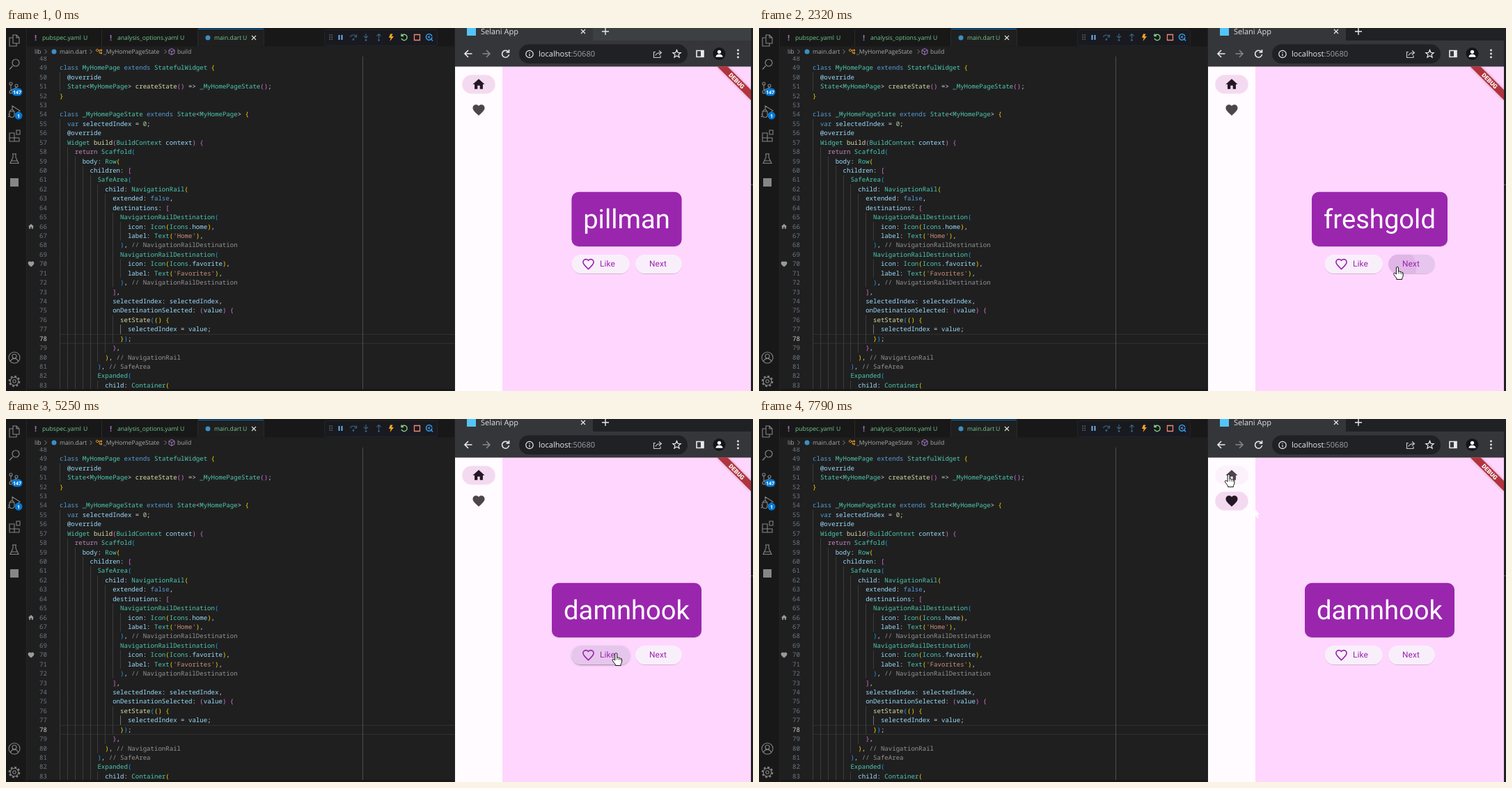
An HTML page for the animation above (8 s loop, 1073 by 522 pixels).

```html
<!DOCTYPE html>
<html lang="en">
<head>
<meta charset="utf-8">
<title>Editor and app preview</title>
<style>
html, body { margin: 0; width: 100%; height: 100%; overflow: hidden; background: #1f1f1f; }
svg { display: block; text-rendering: geometricPrecision; }
.code { font: 9.07px "Noto Sans Mono", monospace; }
.ui { font: 8.65px "Open Sans", sans-serif; }
.app { font-family: Roboto, sans-serif; }
</style>
</head>
<body>
<svg id="stage" width="1073" height="522" viewBox="0 0 1073 522"></svg>
<script>
const LOOP = 8000;
const stage = document.getElementById('stage');
const PURPLE = '#9a25ae';
const HOME = 'M10 20v-6h4v6h5v-8h3L12 3 2 12h3v8z';
const HEART = 'M12 21.35l-1.45-1.32C5.4 15.36 2 12.28 2 8.5 2 5.42 4.42 3 7.5 3c1.74 0 3.41.81 4.5 2.09C13.09 3.81 14.76 3 16.5 3 19.58 3 22 5.42 22 8.5c0 3.78-3.4 6.86-8.55 11.54z';

const rect = (x, y, w, h, fill, more = '') =>
  `<rect x="${x}" y="${y}" width="${w}" height="${h}" fill="${fill}" ${more}/>`;
const dot = (x, y, r, fill, more = '') =>
  `<circle cx="${x}" cy="${y}" r="${r}" fill="${fill}" ${more}/>`;
const text = (x, y, s, fill, more = '') =>
  `<text x="${x}" y="${y}" fill="${fill}" ${more}>${s.replace(/&/g, '&amp;').replace(/</g, '&lt;')}</text>`;
// Stroked glyph drawn around its own centre
const line = (x, y, d, color, w = 1.1, fill = 'none') =>
  `<path transform="translate(${x} ${y})" d="${d}" fill="${fill}" stroke="${color}" stroke-width="${w}"/>`;
// Filled icon on a 24 unit grid
const icon = (d, x, y, scale, more) =>
  `<path d="${d}" transform="translate(${x} ${y}) scale(${scale}) translate(-12 -12)" ${more}/>`;

const CODE = `
class MyHomePage extends StatefulWidget {
  @override
  State<MyHomePage> createState() => _MyHomePageState();
}

class _MyHomePageState extends State<MyHomePage> {
  var selectedIndex = 0;
  @override
  Widget build(BuildContext context) {
    return Scaffold(
      body: Row(
        children: [
          SafeArea(
            child: NavigationRail(
              extended: false,
              destinations: [
                NavigationRailDestination(
                  icon: Icon(Icons.home),
                  label: Text('Home'),
                ), // NavigationRailDestination
                NavigationRailDestination(
                  icon: Icon(Icons.favorite),
                  label: Text('Favorites'),
                ), // NavigationRailDestination
              ],
              selectedIndex: selectedIndex,
              onDestinationSelected: (value) {
                setState(() {
                  selectedIndex = value;
                });
              },
            ), // NavigationRail
          ), // SafeArea
          Expanded(
            child: Container(`.split('\n');

const BRACKETS = ['#ffd700', '#da70d6', '#179fff'];
let depth = 0;

function colorOf(tok, rest) {
  if (tok.startsWith('//')) return '#939393';
  if (tok[0] === "'") return '#ce9178';
  if (/^[([{]$/.test(tok)) return BRACKETS[depth++ % 3];
  if (/^[)\]}]$/.test(tok)) return BRACKETS[--depth % 3];
  if (/^(class|extends|var|false)$/.test(tok)) return '#569cd6';
  if (tok === 'return') return '#c586c0';
  if (/^_?[A-Z]/.test(tok)) return '#4ec9b0';
  if (/^\d/.test(tok)) return '#b5cea8';
  if (/^@?\w/.test(tok)) return rest[0] === '(' ? '#dcdcaa' : '#9cdcfe';
  return '#d4d4d4';
}

function editor() {
  const cw = 5.44, lh = 13.43, x0 = 77;
  let out = rect(30, 41, 615, 481, '#1f1f1f');
  out += rect(77, 440, 568, 1, '#303030') + rect(77, 453, 568, 1, '#303030');
  out += rect(512, 41, 1, 481, '#4e4e4e');
  CODE.forEach((src, i) => {
    const n = 48 + i, mid = 57.2 + lh * (i - 1), base = mid + 3.1;
    out += text(59, base, String(n), n === 78 ? '#d0d0d0' : '#6e7681', 'text-anchor="end"');
    const indent = src.search(/\S/) / 2;
    for (let j = 0; j < indent; j++)
      out += rect(Math.round(x0 + j * 2 * cw), mid - lh / 2, 1, lh, j === 8 && n === 77 ? '#707070' : '#3c3c3c');
    for (const m of src.matchAll(/\/\/.*|'[^']*'|@?\w+|\S/g))
      out += text(x0 + m.index * cw, base, m[0], colorOf(m[0], src.slice(m.index + m[0].length)));
  });
  out += icon(HOME, 36, 285.5, .42, 'fill="#9a9a9a"') + icon(HEART, 36, 339.5, .44, 'fill="#9a9a9a"');
  return `<g class="code">${out}</g>` + rect(30, 519, 615, 3, '#181818');
}

function tabs() {
  const green = '#73c991', grey = '#a9a9a9';
  let out = rect(30, 0, 615, 27, '#181818') + rect(30, 26.4, 615, 14.6, '#1f1f1f');
  out += rect(276, 1.5, 94, 25, '#1f1f1f') + rect(276, 1, 94, 1, '#0078d4');
  for (const x of [137, 275, 370]) out += rect(x, 2, 1, 24.4, '#2b2b2b');
  const bang = 'font-weight="700" font-size="11"';
  out += text(41, 18, '!', '#a074c4', bang) + text(149, 18, '!', '#a074c4', bang);
  out += text(52, 17, 'pubspec.yaml', green) + text(111, 17, 'U', green);
  out += text(160, 17, 'analysis_options.yaml', green) + text(250, 17, 'U', green);
  out += dot(290, 14, 3.5, '#3b8ec2') + text(299, 17, 'main.dart', green) + text(340, 17, 'U', green);
  out += line(356, 14, 'M-3-3L3 3M3-3L-3 3', '#e0e0e0');
  out += text(41, 37, 'lib', grey) + text(77, 37, 'main.dart', grey);
  out += text(140, 37, '_MyHomePageState', grey) + text(246, 37, 'build', grey);
  for (const x of [57, 122, 229]) out += line(x, 34, 'M-1.5-3L1.5 0L-1.5 3', '#8a8a8a', .9);
  out += dot(69, 34, 3.5, '#3b8ec2');
  out += line(133, 34, 'M-4-2l2-2 2 2-2 2zM0-2h3M1-2v4h2M3-3h1.5v2H3zM3 1h1.5v2H3z', '#ee9d28', .9);
  out += line(238, 34, 'M0-4.5L4-2.3V2.3L0 4.5-4 2.3V-2.3zM-4-2.3L0 0 4-2.3M0 0V4.5', '#b180d7', .9);

  out += rect(457.5, 2.5, 162, 23, '#181a1f', 'rx="2" stroke="#22252c"');
  for (let i = 0; i < 6; i++) out += rect(464.5 + (i % 2) * 3, 9.5 + (i >> 1) * 3, 1.3, 1.3, '#8a8a8a');
  out += line(480.5, 13.5, 'M-2-3.5V3.5M2-3.5V3.5', '#75beff', 1.8);
  const dim = '#3d5f7d';
  out += line(499, 13.5, 'M-4.5-.5C-3-4.5 3-4.5 4.5-.5M4.5-4V-.5H1', dim, 1.2) + dot(499, 16.5, 1.4, dim);
  out += line(517, 13, 'M0-5V1.5M-3-1.5L0 1.5 3-1.5', dim, 1.2) + dot(517, 17.5, 1.4, dim);
  out += line(535.5, 13, 'M0 2.5V-4.5M-3-1.5L0-4.5 3-1.5', dim, 1.2) + dot(535.5, 17.5, 1.4, dim);
  out += '<path d="M552 8.5h3.5l-1.5 3.5h3l-5.5 7 1.2-5H550z" fill="#f5a623"/>';
  out += line(572, 13.5, 'M-3.5-2.5A4.2 4.2 0 1 1-4 1.5M-4-5V-2H-1', '#89d185', 1.4);
  out += line(590.5, 13.5, 'M-4-4H4V4H-4z', '#f48771', 1.3);
  out += line(608, 13, 'M4 0A4.3 4.3 0 1 1 3.9-1M1-1.5L-1.5 0 1 1.5M2 2L5 5.5', '#3b9bea', 1.4);
  return `<g class="ui">${out}</g>`;
}

function sidebar() {
  const c = '#868686';
  const badge = (x, y, w, s) => rect(x - w / 2, y - 5.5, w, 11, '#0078d4', 'rx="5.5"') +
    text(x, y + 2.6, s, '#fff', 'text-anchor="middle" font-size="7" font-weight="700"');
  let out = rect(0, 0, 30, 522, '#181818') + rect(29, 0, 1, 522, '#252525');
  out += line(12, 18, 'M-2-8H3L7-4V4H-2zM3-8V-4H7M-2-4H-7V8H3V4', c);
  out += line(12, 52, 'M-2.5 2.5L-7 7.5M7-2A5 5 0 1 1-3-2A5 5 0 1 1 7-2z', c, 1.2);
  out += line(11, 86, 'M-2-6a2 2 0 1 1-4 0a2 2 0 1 1 4 0M6-3a2 2 0 1 1-4 0a2 2 0 1 1 4 0M-2 6a2 2 0 1 1-4 0a2 2 0 1 1 4 0M-4-4V4M4-1C4 2-3 1-4 4', c);
  out += badge(16, 92, 15, '147');
  out += line(12, 120, 'M-3-2V-8L8-1 1 4M-7 0H0V5A3.5 3.5 0 0 1-7 5zM-9 4H-7M-9 8L-7 6M-6 0A2.5 2.5 0 0 1-1 0', c);
  out += badge(18, 126, 11, '1');
  out += line(12, 155, 'M-7-4H0V3H7V8H-7zM-7 3H0V8M3-8H8V-2H3z', c);
  out += line(12, 188, 'M-3-7H3M-2-7V-2L-6 6.5H6L2-2V-7M-4 3H4', c);
  out += rect(6, 216, 12, 12, c);
  out += line(12, 474, 'M8 0A8 8 0 1 1-8 0A8 8 0 1 1 8 0zM3-2A3 3 0 1 1-3-2A3 3 0 1 1 3-2zM-5.5 5.5C-4 0 4 0 5.5 5.5', c);
  out += dot(12, 508, 2.2, 'none', `stroke="${c}" stroke-width="1.1"`);
  out += dot(12, 508, 5.8, 'none', `stroke="${c}" stroke-width="1.1"`);
  out += dot(12, 508, 7.3, 'none', `stroke="${c}" stroke-width="2" stroke-dasharray="2.9 2.83"`);
  return `<g class="ui">${out}</g>`;
}

function browser() {
  const w = '#e8eaed', g = '#9aa0a6';
  let out = rect(644, 0, 429, 522, '#202124') + rect(843, 0, 227, 18, '#202124', 'id="strip"');
  out += rect(645, 0, 198, 20, '#35363a') + rect(645, 18, 425, 38, '#35363a');
  out += rect(662, -2, 13, 13, '#54c5f8');
  out += text(682, 8.5, 'Selani App', '#dfe1e5', 'font-size="11"');
  out += line(829, 5, 'M-3-3L3 3M3-3L-3 3', w, 1.2) + line(861, 5, 'M-5 0H5M0-5V5', w, 1.4);
  out += line(664, 37, 'M5.5 0H-5M0-5L-5 0 0 5', w, 1.6) + line(690, 37, 'M-5.5 0H5M0-5L5 0 0 5', '#85888c', 1.5);
  out += line(717.5, 37, 'M4-2.8A5 5 0 1 0 5 1M5-6V-2H1', w, 1.6);
  out += rect(737, 23.5, 242, 27.5, '#202124', 'rx="13.75"');
  out += dot(752, 37.5, 5.2, 'none', `stroke="${w}" stroke-width="1.2"`) + line(752, 37.5, 'M0-2.8V-1.4M0-.3V3', w, 1.2);
  out += `<text x="765" y="41" font-size="11.1" fill="${w}">localhost<tspan fill="${g}">:50680</tspan></text>`;
  out += line(936, 37.5, 'M-3-3H-5.5V5H4V2M-3 2C-2-1 0-2 5-2M2-5L5.5-2 2 1', '#c4c7cb', 1.2);
  out += line(963.5, 37, 'M0-5.5L1.6-1.7 5.7-1.5 2.5 1.2 3.6 5.2 0 3-3.6 5.2-2.5 1.2-5.7-1.5-1.6-1.7z', w, 1.2);
  out += line(997, 37, 'M-5-4.5H5V4.5H-5z', w, 1.6) + rect(998, 32.5, 4, 9, w);
  out += dot(1024.5, 37, 9, '#141518') + dot(1024.5, 34.3, 2.6, '#fff') +
    '<path d="M1019.5 41.8c0-5.3 10-5.3 10 0z" fill="#fff"/>';
  for (const y of [32, 37, 42]) out += dot(1051.5, y, 1.4, w);
  out += rect(645, 55.5, 68, 467, '#fffbff') + rect(713, 55.5, 357, 467, '#ffd6fe');
  out += rect(1070, 225, 3, 1, '#5a5a5a');
  return `<g class="ui">${out}</g>`;
}

function banner() {
  return '<g clip-path="url(#page)"><g transform="translate(1070 55.5) rotate(45) scale(.85)">' +
    rect(-40, 28, 80, 12, '#b71c1c', 'fill-opacity=".63" filter="url(#soft)"') +
    rect(-40, 28, 80, 12, '#b0343d') +
    text(0, 37.7, 'DEBUG', '#fff', 'text-anchor="middle" font-size="10.2" font-weight="900"') + '</g></g>';
}

const BUTTONS = { like: [812.5, 83.5], next: [904, 67] };
const pill = (id, inner) => {
  const [x, w] = BUTTONS[id];
  const shape = more => rect(x, 325.7, w, 27.2, '#f9effb', 'rx="13.6" ' + more);
  return `<clipPath id="${id}Clip">${shape('')}</clipPath>` +
    `<g id="${id}Lift" opacity="0">${shape('filter="url(#high)"')}</g>` + shape('filter="url(#low)"') +
    `<g clip-path="url(#${id}Clip)">` + rect(x, 325, w, 29, PURPLE, `id="${id}Tint"`) +
    dot(0, 0, 0, PURPLE, `id="${id}Wave"`) + '</g>' + inner;
};

function app() {
  const label = 'font-size="11.9" letter-spacing=".08"';
  let out = '';
  for (const [id, y] of [['home', 81], ['fav', 118]]) {
    out += rect(655.3, y - 13.6, 47.5, 27.2, PURPLE, `rx="13.6" id="${id}Hover"`);
    out += `<g transform="translate(679 ${y})">` +
      rect(-23.75, -13.6, 47.5, 27.2, '#f4daf0', `rx="13.6" id="${id}Mark"`) + '</g>';
  }
  out += icon(HOME, 679, 81, .85, 'id="homeIcon"') + icon(HEART, 679, 118, .85, 'id="favIcon"');
  out += rect(812, 235.8, 158, 78.2, PURPLE, 'rx="10" id="card" filter="url(#low)"');
  out += text(891.5, 287.7, '', '#fff', 'id="word" font-size="38.2" text-anchor="middle"');
  out += pill('like', icon(HEART, 836.5, 339.5, .76, `id="heart" stroke="${PURPLE}" stroke-width="2.2"`) +
    text(853, 343.2, 'Like', PURPLE, label));
  out += pill('next', text(924, 343.2, 'Next', PURPLE, label));
  out += '<path id="trace" d="M713 130.5l6.5 7h-3.5l2 4.6-2.2.9-1.8-4-1 1z" fill="#fff"/>';
  out += dot(0, 0, 11, '#f0d936', 'id="flash" opacity=".8"');
  const ink = 'fill="#fff" stroke="#111" stroke-width="1" stroke-linejoin="round"';
  out += `<path id="arrow" ${ink} d="M.5.5V15.5L4 12.3 6.3 17.6 8.6 16.6 6.3 11.4H11z"/>`;
  out += `<g id="hand" ${ink}><path d="M-1.5 1Q-1.5-.5 0-.5Q1.5-.5 1.5 1V6Q3.5 5.3 4.1 6.6Q5.9 6 6.4 7.4Q8.3 7 8.3 9V12Q8.3 14 6.8 15.5V17.5H-1V16Q-3 13.5-4.7 11Q-6 9-4.6 8.3Q-3.2 8-1.5 10z"/>` +
    '<path d="M1.5 6v3.5M4.2 6.8v3M6.5 7.6v2.6" stroke-width=".7"/></g>';
  return `<g class="app">${banner()}${out}</g>`;
}

const shadow = (id, dy, blur, alpha) =>
  `<filter id="${id}" x="-20%" y="-40%" width="140%" height="200%"><feDropShadow dx="0" dy="${dy}" stdDeviation="${blur}" flood-color="#000" flood-opacity="${alpha}"/></filter>`;

stage.innerHTML = '<defs><clipPath id="page"><rect x="645" y="55.5" width="425" height="467"/></clipPath>' +
  shadow('low', .7, .7, .22) + shadow('high', 1.2, 1.5, .24) + shadow('soft', 0, 2.5, .4) + '</defs>' +
  editor() + tabs() + sidebar() + browser() + app();

const el = {};
stage.querySelectorAll('[id]').forEach(e => el[e.id] = e);
const set = (id, attrs) => { for (const k in attrs) el[id].setAttribute(k, attrs[k]); };

// Pointer stops: time, x, y
const PATH = [
  [850, 1013, 499], [1580, 911.5, 346.5], [1659, 911.5, 346.5], [1660, 916.9, 344],
  [3690, 916.9, 344], [3870, 876.3, 337], [5345, 876.3, 337], [5530, 757, 177],
  [6050, 685.2, 106.5], [6280, 685.2, 106.5], [6390, 684, 113], [7490, 684, 113], [7770, 674.6, 80.2]
];
// Presses: button, down, up, full radius
const PRESSES = [['next', 2080, 2250, 42], ['next', 2870, 3220, 42], ['like', 3880, 3950, 54], ['like', 4760, 4880, 54]];
const FLASHES = [2080, 2870, 3880, 4760, 6710];
const LEVELS = {
  next: [[1660, 0], [1760, .08], [2080, .08], [2180, .2], [3720, .2], [3800, 0]],
  like: [[3780, 0], [3840, .08], [3880, .08], [3930, .2], [5390, .2], [5530, 0]]
};

const clamp = v => Math.max(0, Math.min(1, v));
const ramp = (t, a, b) => clamp((t - a) / (b - a));
const ease = p => p * (2 - p);

function track(steps, t, curve = p => p) {
  let i = steps.findIndex(s => s[0] > t);
  if (i === 0) return steps[0].slice(1);
  if (i < 0) return steps[steps.length - 1].slice(1);
  const a = steps[i - 1], b = steps[i], p = curve(ramp(t, a[0], b[0]));
  return a.slice(1).map((v, k) => v + (b[k + 1] - v) * p);
}

function draw(t) {
  const [x, y] = track(PATH, t, ease);
  const hand = t >= 1660 && t < 5390 || t >= 5960;
  set('hand', { transform: `translate(${x} ${y})`, visibility: hand ? 'visible' : 'hidden' });
  set('arrow', { transform: `translate(${x} ${y})`, visibility: !hand && t >= 850 ? 'visible' : 'hidden' });
  const lit = FLASHES.some(f => t >= f && t < f + 140);
  set('flash', { cx: x, cy: y, visibility: lit ? 'visible' : 'hidden' });
  set('trace', { visibility: t >= 5870 ? 'visible' : 'hidden' });

  // The first click gives the browser window focus
  set('strip', { fill: t < 2080 ? '#3c4043' : '#202124' });

  const [word, width] = t < 2250 ? ['pillman', 158] : t < 3220 ? ['freshgold', 195] : ['damnhook', 215];
  el.word.textContent = word;
  set('card', { x: 891.5 - width / 2, width });
  set('heart', { fill: t >= 3950 && t < 4880 ? PURPLE : 'none' });

  for (const id in BUTTONS) {
    const level = track(LEVELS[id], t)[0];
    const press = PRESSES.find(p => p[0] === id && t >= p[1] && t < p[2] + 340);
    set(id + 'Tint', { opacity: level });
    set(id + 'Lift', { opacity: press ? 0 : clamp(level / .08) });
    if (press) {
      const [, down, up, full] = press;
      const grow = Math.max(ease(ramp(t, down, down + 800)), ramp(t, up, up + 225));
      set(id + 'Wave', { cx: x, cy: y, r: 12 + (full - 12) * grow, opacity: .12 * (1 - ramp(t, up, up + 340)) });
    } else set(id + 'Wave', { r: 0 });
  }

  const sel = ramp(t, 6780, 7060);
  set('homeMark', { opacity: 1 - sel });
  set('favMark', { opacity: sel, transform: `scale(${.5 + ease(sel) / 2} 1)` });
  set('homeHover', { opacity: .04 * ramp(t, 7580, 7720) });
  set('favHover', { opacity: .04 * ramp(t, 6000, 6100) * (1 - ramp(t, 7580, 7720)) });
  set('homeIcon', { fill: sel < .5 ? '#251626' : '#4d444c' });
  set('favIcon', { fill: sel < .5 ? '#4d444c' : '#251626' });
}

const start = performance.now();
function tick() {
  draw((performance.now() - start) % LOOP);
  requestAnimationFrame(tick);
}
tick();
</script>
</body>
</html>
```
